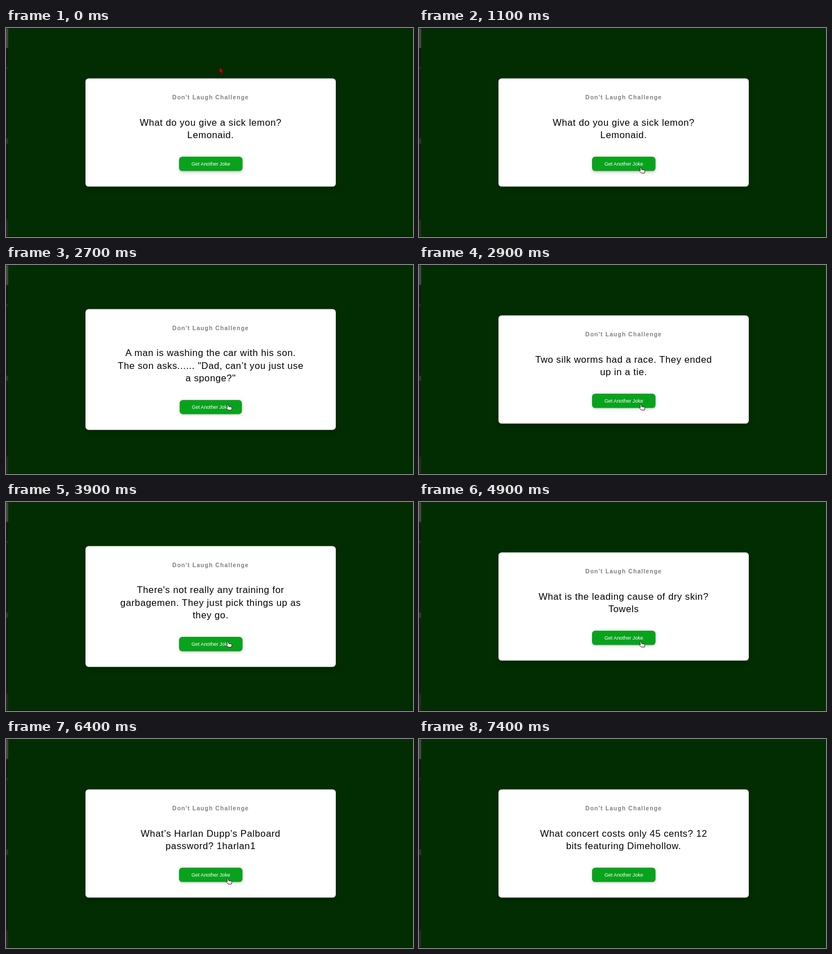
Recreate the animation shown at these times as an HTML page. Size 722 by 372 pixels, loop 7.7 s.

```html
<!DOCTYPE html>
<html lang="en">
<head>
<meta charset="utf-8">
<title>Don't Laugh Challenge</title>
<style>
  :root { --loop: 7700ms; }
  * { box-sizing: border-box; }
  html, body { margin: 0; width: 100%; height: 100%; overflow: hidden; }
  body {
    position: relative;
    background: #022d02;
    font-family: "Liberation Sans", Arial, sans-serif;
  }

  /* window edges */
  .edge { position: absolute; }
  .left {
    left: 0; top: 0; width: 4px; height: 100%;
    background: linear-gradient(#454545 0 35px, #161a17 36px 69px, #252825 70px 73px,
      #171b18 74px 196px, #303330 198px 205px, #171b18 207px 340px, #262826 342px);
  }
  .top { left: 0; top: 0; width: 100%; height: 1px; background: #141e14; }
  .bottom { left: 0; bottom: 0; width: 100%; height: 1px; background: #0a160a; }

  .card {
    position: absolute;
    left: 363px; top: 186.3px;
    width: 800px;
    padding: 50px 20px;
    border-radius: 10px;
    background: #fff;
    box-shadow: 0 10px 20px rgba(0, 0, 0, .1), 0 6px 6px rgba(0, 0, 0, .1);
    text-align: center;
    transform: translate(-50%, -50%) scale(.555);
    visibility: hidden;
    animation: var(--show) var(--loop) step-end infinite;
  }
  h3 {
    margin: 0;
    font-size: 18.72px; line-height: 21px; letter-spacing: 2px;
    color: #808080;
  }
  p {
    margin: 50px 0;
    font-size: 30px; line-height: 40px; letter-spacing: 1px;
    white-space: nowrap;
    color: #000;
  }
  .btn {
    display: block;
    width: 203px; height: 46px;
    margin: 0 auto;
    border-radius: 10px;
    background: #09a21d;
    color: #fff;
    font-size: 16px; line-height: 46px;
    box-shadow: 0 5px 15px rgba(0, 0, 0, .1), 0 6px 6px rgba(0, 0, 0, .1);
    animation: press var(--loop) step-end infinite;
  }

  @keyframes joke1 { 0% { visibility: visible } 24.67%, 100% { visibility: hidden } }
  @keyframes joke2 { 24.67% { visibility: visible } 37.66%, 100% { visibility: hidden } }
  @keyframes joke3 { 37.66% { visibility: visible } 50.64%, 100% { visibility: hidden } }
  @keyframes joke4 { 50.64% { visibility: visible } 63.63%, 100% { visibility: hidden } }
  @keyframes joke5 { 63.63% { visibility: visible } 74.02%, 100% { visibility: hidden } }
  @keyframes joke6 { 74.02% { visibility: visible } 85.71%, 100% { visibility: hidden } }
  @keyframes joke7 { 85.71%, 100% { visibility: visible } }

  @keyframes press {
    0%, 22.07%, 36.36%, 49.35%, 62.33%, 72.72%, 83.11%, 100% { transform: none }
    19.48%, 33.76%, 46.75%, 59.74%, 70.12%, 81.81% {
      transform: scale(.98);
      box-shadow: 0 2px 15px rgba(0, 0, 0, .1), 0 3px 6px rgba(0, 0, 0, .1);
    }
  }

  .cursor {
    position: absolute; left: 0; top: 0;
    width: 16px; height: 20px;
    overflow: visible;
    animation: move var(--loop) infinite;
  }
  .arrow { animation: arrow var(--loop) step-end infinite; }
  .hand { animation: hand var(--loop) step-end infinite; }

  @keyframes move {
    0% { transform: translate(378px, 69px); animation-timing-function: steps(8) }
    10.38% { transform: translate(396px, 239px); animation-timing-function: steps(3) }
    14.28% { transform: translate(393px, 248px); animation-timing-function: step-end }
    87.01% { transform: translate(393px, 248px); animation-timing-function: steps(6) }
    94.8%, 100% { transform: translate(381px, 2px) }
  }
  @keyframes arrow {
    0%, 88.3% { visibility: visible }
    10.38%, 96.1%, 100% { visibility: hidden }
  }
  @keyframes hand {
    0%, 88.3%, 100% { visibility: hidden }
    10.38% { visibility: visible }
  }
</style>
</head>
<body>
<div class="edge left"></div>
<div class="edge top"></div>
<div class="edge bottom"></div>

<svg class="cursor" viewBox="0 0 16 20">
  <path class="arrow" d="M.5 .5V11.5L3 9.4L5 14.2L7 13.3L5 8.7H8.4Z"
        fill="#b80808" stroke="#3a0606" stroke-width=".9"/>
  <path class="hand" d="M-.9 1Q.3 -.6 1.3 1L2 4L6.6 4.8Q7.8 5.2 7.6 6.6L7 10.2H1.2L-2.2 6.4Q-2 5 -.2 5.8Z"
        fill="#fff" stroke="#111" stroke-width=".9" stroke-linejoin="round"/>
</svg>

<script>
  const jokes = [
    'What do you give a sick lemon?<br>Lemonaid.',
    'A man is washing the car with his son.<br>The son asks...... "Dad, can’t you just use<br>a sponge?"',
    'Two silk worms had a race. They ended<br>up in a tie.',
    "There's not really any training for<br>garbagemen. They just pick things up as<br>they go.",
    'What is the leading cause of dry skin?<br>Towels',
    'What’s Harlan Dupp’s Palboard<br>password? 1harlan1',
    'What concert costs only 45 cents? 12<br>bits featuring Dimehollow.'
  ];
  const card = (joke, i) => `
    <div class="card" style="--show: joke${i + 1}">
      <h3>Don't Laugh Challenge</h3>
      <p>${joke}</p>
      <span class="btn">Get Another Joke</span>
    </div>`;
  document.querySelector('.cursor').insertAdjacentHTML('beforebegin', jokes.map(card).join(''));
</script>
</body>
</html>
```
